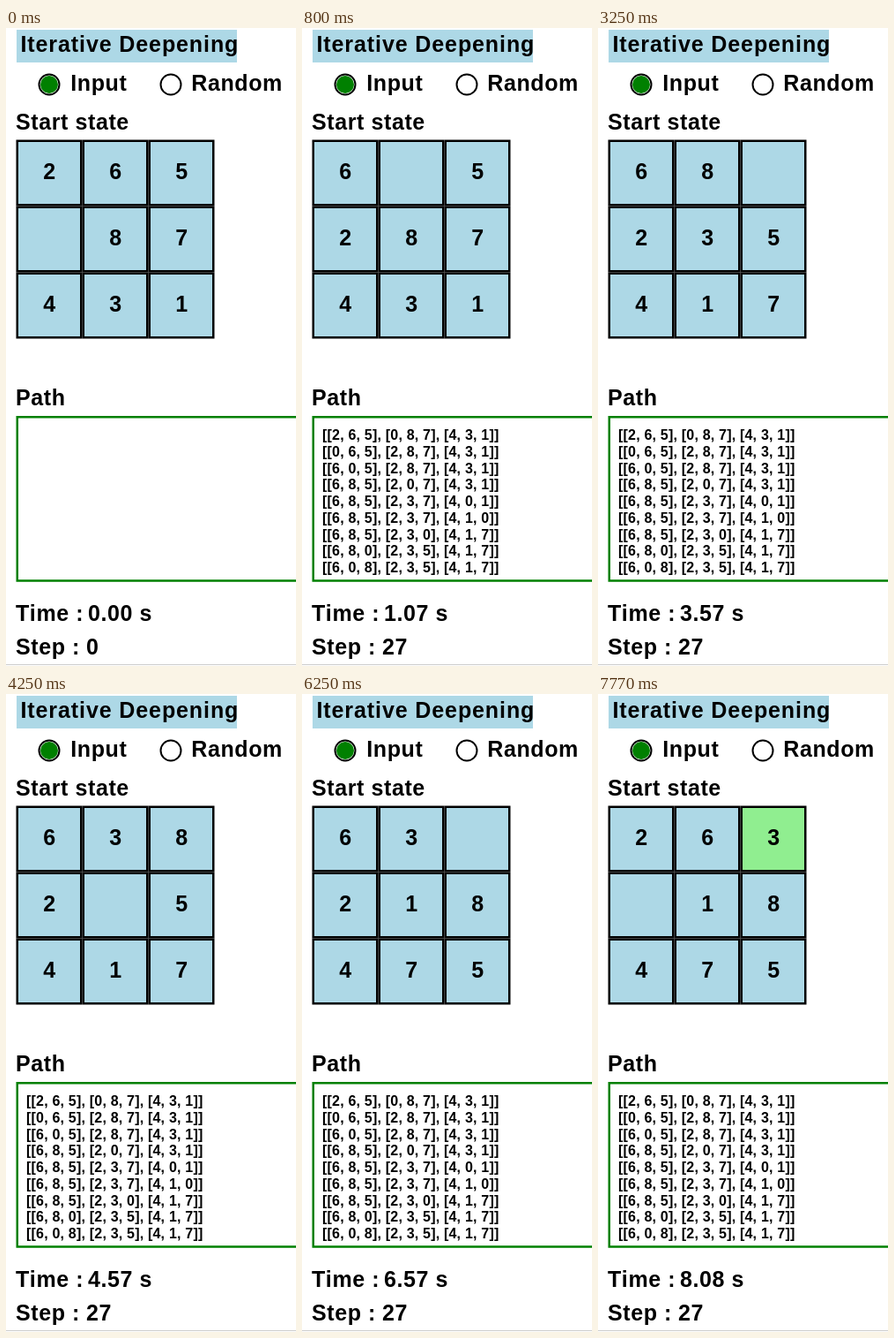
These frames come from a looping animation (329 by 722 pixels, 8000 ms). An HTML page:

```html
<!DOCTYPE html>
<html lang="en">
<head>
<meta charset="utf-8">
<style>
  html, body { margin: 0; width: 100%; height: 100%; overflow: hidden; background: #fff; }
  svg { display: block; }
  text {
    font: bold 25px "Liberation Sans", Arial, sans-serif;
    font-kerning: none;
    letter-spacing: .6px;
    white-space: pre;
  }
  .title { letter-spacing: .9px; }
  .tile { text-anchor: middle; letter-spacing: 0; }
  .path text { font-size: 16px; letter-spacing: .2px; }
</style>
</head>
<body>
<svg width="329" height="722" viewBox="0 0 329 722">
  <rect x="12" y="2" width="250" height="37" fill="#add8e6"/>
  <text class="title" x="16.5" y="27">Iterative Deepening</text>
  <g stroke="#000" stroke-width="2" fill="#fff">
    <circle cx="49" cy="64" r="11.5"/>
    <circle cx="187" cy="64" r="11.5"/>
  </g>
  <circle cx="49" cy="64" r="10" fill="#008000"/>
  <text x="73.3" y="71">Input</text>
  <text x="210.3" y="71">Random</text>
  <text x="11" y="115">Start state</text>
  <g id="board"></g>
  <text x="11" y="427">Path</text>
  <rect x="12.75" y="440.25" width="400" height="185.25" fill="none" stroke="#008000" stroke-width="2.5"/>
  <g id="path" class="path"></g>
  <text x="11" y="671">Time :</text>
  <text id="time" x="93" y="671"></text>
  <text x="11" y="709">Step :</text>
  <text id="step" x="91" y="709"></text>
  <rect y="720" width="329" height="1" fill="#ccc"/>
</svg>
<script>
const LOOP = 8000;
const changes = [0, 260, 800, 1260, 1790, 2260, 2780, 3250, 3780,
  4250, 4780, 5250, 5780, 6250, 6780, 7240, 7770];
const offsets = { U: -3, D: 3, L: -1, R: 1 };
const $ = id => document.getElementById(id);

// Slide the blank (0) through the solution moves.
const states = [[2, 6, 5, 0, 8, 7, 4, 3, 1]];
for (const move of 'URDDRUULDDRUULLD') {
  const next = [...states.at(-1)];
  const from = next.indexOf(0), to = from + offsets[move];
  next[from] = next[to];
  next[to] = 0;
  states.push(next);
}

const rows = s => [0, 3, 6].map(i => `[${s.slice(i, i + 3).join(', ')}]`);
const pathText = states.slice(0, 9).map((s, i) =>
  `<text x="23" y="${466 + i * 18.75}">[${rows(s).join(', ')}]</text>`).join('');

// Tiles already in their goal place are green.
function tile(value, i) {
  const x = 11.5 + i % 3 * 75, y = 126.5 + Math.floor(i / 3) * 75;
  const fill = value === i + 1 ? '#90ee90' : '#add8e6';
  return `<rect x="${x + 1.25}" y="${y + 1.25}" width="72.5" height="72.5"
    fill="${fill}" stroke="#000" stroke-width="2.5"/>
    <text class="tile" x="${x + 37.7}" y="${y + 44.5}">${value || ''}</text>`;
}

function show(step) {
  const seconds = step ? 0.5645 + 0.5008 * (step - 1) : 0;
  $('board').innerHTML = states[step].map(tile).join('');
  $('path').innerHTML = step ? pathText : '';
  $('time').textContent = seconds.toFixed(2) + ' s';
  $('step').textContent = step ? 27 : 0;
}

let shown = -1;
function frame() {
  const t = performance.now() % LOOP;
  const step = changes.findLastIndex(start => start <= t);
  if (step !== shown) show(shown = step);
  requestAnimationFrame(frame);
}
frame();
</script>
</body>
</html>
```
